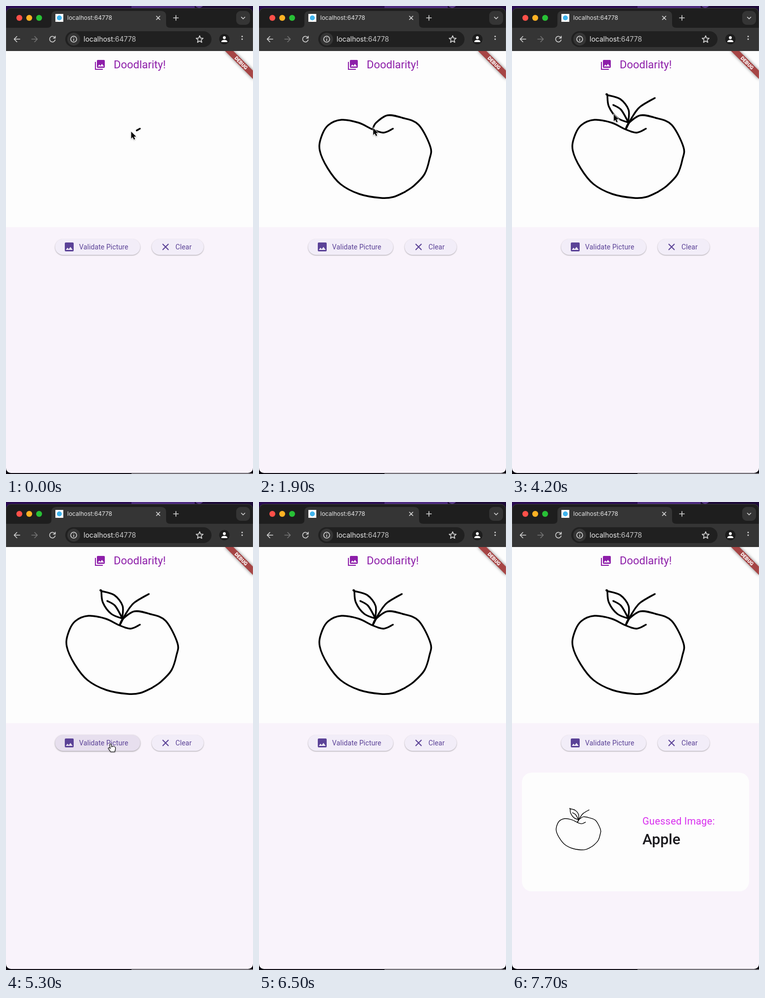
Write an HTML page that moves like this. It is 500 px wide and 946 px high and loops after 7900 ms.

```html
<!DOCTYPE html>
<html lang="en">
<head>
<meta charset="utf-8">
<title>Drawing game</title>
<style>
html, body { margin: 0; width: 100%; height: 100%; overflow: hidden; background: #000; }
svg { display: block; }
.ui { font-family: Inter, sans-serif; }
.app { font-family: Roboto, sans-serif; }
.line { fill: none; stroke-linecap: round; stroke-linejoin: round; }
.button rect { fill: #f2edf8; filter: drop-shadow(0 1px 1px rgba(0, 0, 0, .32)); }
.button.hover rect { fill: #e7dfee; filter: drop-shadow(0 1.5px 1.5px rgba(0, 0, 0, .4)); }
.button { fill: #5b4297; font-size: 14px; letter-spacing: .1px; }
.band { filter: drop-shadow(0 0 3px rgba(0, 0, 0, .5)); }
.pointer { filter: drop-shadow(0 1px 1px rgba(0, 0, 0, .3)); }
</style>
</head>
<body>
<svg width="500" height="946">
  <defs>
    <clipPath id="window"><rect y="4" width="500" height="940" rx="10"/></clipPath>
    <clipPath id="page"><rect y="91" width="500" height="853"/></clipPath>
    <path id="picture" fill-rule="evenodd" d="M2 0H16a2 2 0 0 1 2 2V16a2 2 0 0 1-2 2H2a2 2 0 0 1-2-2V2a2 2 0 0 1 2-2ZM2 15H16L11.5 9 8 13.5 5.500 10.500Z"/>
  </defs>

  <!-- desktop behind the window -->
  <rect width="500" height="946" fill="#0b0710"/>
  <rect width="254" height="14" fill="#2a0b52"/>
  <rect x="254" width="246" height="14" fill="#1d0a38"/>
  <rect x="254" width="128" height="5" fill="#4d2a80"/>
  <circle cx="391" cy="-5" r="9" fill="#5b3a8c"/>
  <rect x="254" y="945" width="246" height="1" fill="#c9c6cb"/>

  <g clip-path="url(#window)">
    <rect y="4" width="500" height="88" fill="#1e1e1e"/>
    <path d="M0 44H84Q92 44 92 36V20Q92 10 102 10H314Q324 10 324 20V36Q324 44 332 44H500V91H0Z" fill="#353535"/>
    <circle cx="27" cy="24" r="6" fill="#ff5049"/>
    <circle cx="47" cy="24" r="6" fill="#ffb224"/>
    <circle cx="67" cy="24" r="6" fill="#28c136"/>
    <rect x="100" y="16" width="16" height="16" fill="#fff"/>
    <circle cx="108" cy="24" r="5" fill="#3fb4ee"/>
    <rect x="466" y="10" width="28" height="28" rx="9" fill="#353535"/>
    <rect x="120" y="51" width="296" height="32" rx="16" fill="#202020"/>
    <circle cx="137" cy="67" r="13" fill="#353535"/>
    <g class="ui">
      <text x="124" y="28" font-size="12" fill="#e6e6e6">localhost:64778</text>
      <text x="157" y="72" font-size="14" fill="#ececec">localhost<tspan fill="#c6c6c6">:64778</tspan></text>
    </g>
    <g class="line" stroke="#d2d2d2" stroke-width="1.6">
      <path d="M304.5 20.5l7 7m0-7l-7 7M339 24h10m-5-5v10"/>
      <path d="M476.5 22.5l3.5 3.5 3.5-3.5"/>
      <path d="M28 67H16.500m5.500-5.500l-5.500 5.500 5.500 5.500"/>
      <path d="M52 67h11.500m-5.500-5.500l5.500 5.500-5.500 5.500" stroke="#747474"/>
      <path d="M98.500 63.500A5.700 5.700 0 1 0 99.500 68.500M99.700 61V65H95.700"/>
      <circle cx="137" cy="67" r="6"/>
      <path d="M137 67v3m0-6v.1"/>
      <path id="star"/>
    </g>
    <circle cx="442" cy="67" r="10.5" fill="#1c1c1c"/>
    <circle cx="442" cy="64" r="2.9" fill="#fff"/>
    <path d="M436 73v-1.500q1-3 6-3t6 3V73Z" fill="#fff"/>
    <path class="line" d="M478 61.500v11" stroke="#d2d2d2" stroke-width="3" stroke-dasharray="0 5.500"/>

    <rect y="91" width="500" height="356" fill="#fdfdfd"/>
    <rect y="447" width="500" height="498" fill="#f9f3fb"/>
    <g class="app">
      <g fill="#8d1ea9">
        <use href="#picture" transform="translate(184 109) scale(.89)"/>
        <path d="M181 113V128H196" fill="none" stroke="#8d1ea9" stroke-width="2"/>
        <text x="218" y="126" font-size="22">Doodlarity!</text>
      </g>
      <g clip-path="url(#page)">
        <g transform="translate(500 91) rotate(45)">
          <rect class="band" x="-40" y="28" width="80" height="12" fill="#a64545"/>
          <text y="37.6" font-size="10.2" font-weight="900" fill="#fff" text-anchor="middle">DEBUG</text>
        </g>
      </g>
      <g class="button" id="validate">
        <rect x="99.5" y="471" width="172" height="32" rx="16"/>
        <use href="#picture" x="119" y="478"/>
        <text x="148" y="492">Validate Picture</text>
      </g>
      <g class="button">
        <rect x="295" y="471" width="105" height="32" rx="16"/>
        <path d="M317 481l12 12m0-12l-12 12" stroke="#5b4297" stroke-width="2"/>
        <text x="343" y="492">Clear</text>
      </g>
      <g id="art" class="line" stroke="#000" stroke-width="3.5"></g>
      <g id="card">
        <rect x="20" y="547" width="460" height="240" rx="20" fill="#fdfdfd"/>
        <use href="#art" transform="translate(40.4 548) scale(.4)"/>
        <text x="264" y="652" font-size="20" letter-spacing=".25" fill="#d82fee">Guessed Image:</text>
        <text x="264" y="692" font-size="30" font-weight="500" fill="#1c1b1f">Apple</text>
      </g>
    </g>
  </g>
  <rect x=".5" y="4.5" width="499" height="939" rx="10" fill="none" stroke="#fff" stroke-opacity=".13"/>

  <path id="arrow" class="pointer" d="M0 0V14L3 11 5.500 16 8 15 5.500 10H10Z" stroke="#fff" stroke-width="1.6" paint-order="stroke"/>
  <path id="hand" class="pointer" d="M-2 0Q-.5-2.500 1 0L2 5Q6 2 9.500 6V10L8 15H0L-5 8Q-4 5-1 8Z" fill="#fff" stroke="#000" stroke-width="1.1"/>
</svg>

<script>
const LOOP = 7900, STEP = 100, LEAD = 35;
const HOVER = [4800, 5800], RESULT_AT = 7000;
const $ = id => document.getElementById(id);

// Pen strokes as "x,y" points.
const left = "271,248 252,256 229,249 202,236 167,230 140,241 126,265 123,292 139,328 165,360 203,380 247,388 272,386 295,376";
const right = "295,376 314,363 335,340 345,310 347,285 323,240 290,226 260,221 237,236 230,249";
const stem = "231,248 243,225 259,204 289,186";
const leaf = "235,236 236,210 219,188 193,180 193,180 196,203 213,226 237,236";
const vein = "236,236 221,210 205,200";

const strokes = [
  pen(left, -20, 1100),
  pen(right, 1100, 1880),
  pen(stem, 2050, 2550),
  pen(leaf, 2920, 3650),
  pen(vein, 3750, 4100)
];

// Pointer stops after the drawing: time, x, y.
const stops = [[4100, 205, 200], [4200, 206, 219], [4850, 212, 490], [5700, 212, 490], [6100, 520, 640]];

function pen(text, start, end) {
  const path = document.createElementNS("http://www.w3.org/2000/svg", "path");
  path.setAttribute("d", smooth(text.split(" ").map(p => p.split(",").map(Number))));
  $("art").append(path);
  return { start, end, path, length: path.getTotalLength() };
}

function smooth(pts) {
  const at = i => pts[Math.max(0, Math.min(pts.length - 1, i))];
  let d = "M" + pts[0];
  for (let i = 0; i < pts.length - 1; i++) {
    const [a, b, c, e] = [at(i - 1), at(i), at(i + 1), at(i + 2)];
    const p = b.map((n, k) => n + (c[k] - a[k]) / 6);
    const q = c.map((n, k) => n - (e[k] - b[k]) / 6);
    d += `C${p} ${q} ${c}`;
  }
  return d;
}

function star(x, y, outer, inner) {
  const pts = Array.from({ length: 10 }, (_, i) => {
    const r = i % 2 ? inner : outer, a = i * Math.PI / 5;
    return [x + r * Math.sin(a), y - r * Math.cos(a)];
  });
  return `M${pts.join("L")}Z`;
}

const clamp = v => Math.max(0, Math.min(1, v));
const ease = v => v * v * (3 - 2 * v);
const progress = (s, t) => clamp((t - s.start) / (s.end - s.start));
const pointOn = (s, v) => {
  const p = s.path.getPointAtLength(s.length * v);
  return [p.x + 1, p.y - 2];
};
const mix = (a, b, v) => a.map((n, i) => n + (b[i] - n) * v);

function pointer(t) {
  const ahead = t + LEAD;
  const next = strokes.findIndex(s => ahead < s.end);
  if (next >= 0) {
    const s = strokes[next];
    if (ahead >= s.start) return pointOn(s, progress(s, ahead));
    const last = strokes[next - 1];
    const v = (ahead - last.end) / (s.start - last.end);
    return mix(pointOn(last, 1), pointOn(s, 0), ease(v));
  }
  const i = stops.findIndex(p => t < p[0]);
  if (i < 0) return null;
  if (i === 0) return stops[0].slice(1);
  const [a, b] = [stops[i - 1], stops[i]];
  return mix(a.slice(1), b.slice(1), ease((t - a[0]) / (b[0] - a[0])));
}

const show = (el, on) => { el.style.display = on ? "" : "none"; };

function render(t) {
  for (const s of strokes) {
    const v = progress(s, t);
    show(s.path, v > 0);
    s.path.setAttribute("stroke-dasharray", v < 1 ? `${s.length * v} 9999` : "none");
  }
  const hover = t >= HOVER[0] && t < HOVER[1];
  const pos = pointer(t);
  $("validate").classList.toggle("hover", hover);
  show($("arrow"), pos && !hover);
  show($("hand"), pos && hover);
  if (pos) $(hover ? "hand" : "arrow").setAttribute("transform", `translate(${pos})`);
  show($("card"), t >= RESULT_AT);
}

$("star").setAttribute("d", star(392, 67.5, 7.5, 3.3));
const begin = performance.now();
function tick() {
  const t = (performance.now() - begin) % LOOP;
  render(Math.floor(t / STEP) * STEP);
  requestAnimationFrame(tick);
}
tick();
</script>
</body>
</html>
```
